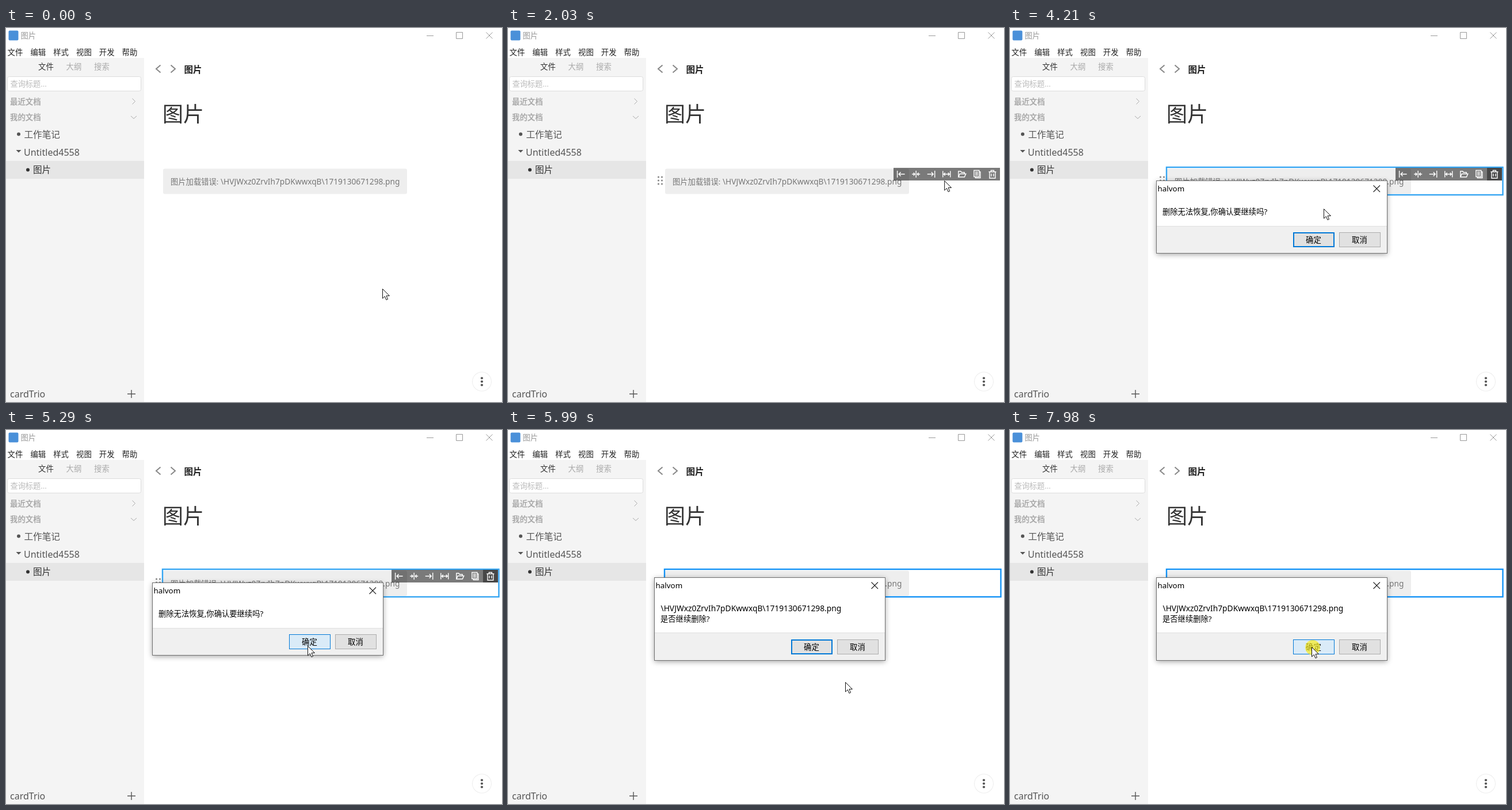
An HTML page that plays this animation: 862x650 px, repeating every 8 s.

```html
<!DOCTYPE html>
<html lang="zh-CN">
<head>
<meta charset="utf-8">
<title>图片</title>
<style>
html, body { margin: 0; width: 100%; height: 100%; overflow: hidden; background: #fff; }
svg { display: block; width: 100%; height: 100%; }
text { font-family: "Noto Sans", "Noto Sans CJK SC", "Noto Sans CJK", sans-serif; white-space: pre; }
.shadow { filter: drop-shadow(0 2px 5px rgba(0, 0, 0, .38)); }
</style>
</head>
<body>
<svg id="stage" viewBox="0 0 862 650"></svg>
<script>
const LOOP = 8000;
const PATH = '\\HVJWxz0ZrvIh7pDKwwxqB\\1719130671298.png';

// y is the optical middle of the line
const txt = (x, y, size, s, fill, extra = '') =>
  `<text x="${x}" y="${y + size * .38}" font-size="${size}" fill="${fill}" ${extra}>${s}</text>`;
const box = (x, y, w, h, fill, extra = '') =>
  `<rect x="${x}" y="${y}" width="${w}" height="${h}" fill="${fill}" ${extra}/>`;
const dot = (x, y, r, fill) => `<circle cx="${x}" cy="${y}" r="${r}" fill="${fill}"/>`;
const line = (d, stroke, w = 1, extra = '') =>
  `<path d="${d}" fill="none" stroke="${stroke}" stroke-width="${w}" ${extra}/>`;
const BOLD = 'font-weight="700"';

function titleBar() {
  return box(4.5, 4.5, 17, 17, '#4a90d9', 'rx="2"') +
    `<g id="caption">${txt(25.5, 13, 13.3, '图片', 'currentColor')}` +
    line('M731 13.5H743M782.5 7.5H793.5V18.5H782.5ZM834.5 7.5L845.5 18.5M845.5 7.5L834.5 18.5', 'currentColor') +
    '</g>' +
    ['文件', '编辑', '样式', '视图', '开发', '帮助']
      .map((s, i) => txt(2.6 + i * 39.8, 42, 13.4, s, '#222')).join('');
}

function sidebar() {
  return box(0, 52, 240, 598, '#f4f4f4') +
    txt(56, 67, 13.4, '文件', '#333') + txt(104.5, 67, 13.4, '大纲', '#aaa') + txt(153, 67, 13.4, '搜索', '#aaa') +
    box(2.5, 84.5, 232, 25, '#fff', 'stroke="#ddd" rx="3"') +
    txt(7.5, 97, 13.2, '查询标题...', '#bbb') +
    txt(7, 128, 13.4, '最近文档', '#aaa', BOLD) + line('M219.5 122.5L224.5 127.5L219.5 132.5', '#aaa') +
    txt(7, 155, 13.4, '我的文档', '#aaa', BOLD) + line('M217 153L222 157.5L227 153', '#aaa') +
    dot(22, 184.5, 3, '#555') + txt(31.5, 185, 15.6, '工作笔记', '#555') +
    '<path d="M17.5 212H26.5L22 216.5Z" fill="#555"/>' + txt(31, 215.5, 16, 'Untitled4558', '#555') +
    box(0, 231, 240, 31, '#e6e6e6') + dot(38, 246.5, 3, '#333') + txt(47, 246.5, 15.6, '图片', '#333') +
    txt(7, 636, 16, 'cardTrio', '#555') + line('M211 636H225M218 629V643', '#555', 1.4);
}

const grip = () => [261.5, 267.5].map(x => [259, 265, 271].map(y => dot(x, y, 1.6, '#888')).join('')).join('');

function toolbar() {
  const icons = [
    'M-6-6V6M7 0H-3M0-3.5L-3.5 0L0 3.5',
    'M0-6V6M-7 0H-2M7 0H2M-4.5-2.5L-2 0L-4.5 2.5M4.5-2.5L2 0L4.5 2.5',
    'M6-6V6M-7 0H3M0-3.5L3.5 0L0 3.5',
    'M-6.5-5.5V5.5M6.5-5.5V5.5M-5 0H5M-2.5-2.5L-5 0L-2.5 2.5M2.5-2.5L5 0L2.5 2.5',
    'M-6 5V-5H-2L-.5-3H4.5V-.5M-6 5L-3.5-.5H7L4.5 5Z',
    'M-5.5-6.5H3.5V4.5H-5.5ZM3.5-4H5.5V6.5H-3V4.5M-3.5-3.5H1.5M-3.5-1H1.5M-3.5 1.5H1.5',
    'M-6.5-4H6.5M-2.5-4V-6.5H2.5V-4M-5-4V7H5V-4M-2-1V4M2-1V4'
  ];
  return box(670, 243, 185, 22, 'rgba(0,0,0,.52)') +
    box(829, 243, 26, 22, 'rgba(0,0,0,.42)', 'id="binHover"') +
    icons.map((d, i) => line(d, '#fff', 1.4, `transform="translate(${682.6 + i * 26.55} 254)"`)).join('');
}

function page() {
  return line('M268.5 64.5L261 71L268.5 77.5', '#888', 2) + line('M286.5 64.5L294 71L286.5 77.5', '#888', 2) +
    txt(309.5, 72, 15.6, '图片', '#222', BOLD) +
    txt(272, 149, 36, '图片', '#333', 'font-weight="300"') +
    box(273, 244.5, 424, 44, '#eee', 'rx="3"') +
    txt(286, 267, 13.3, '图片加载错误:', '#777') + txt(373, 267, 13.7, PATH, '#777') +
    box(272, 242, 584.5, 48, 'none', 'id="outline" stroke-width="2.4"') +
    `<g id="grip">${grip()}</g><g id="tools">${toolbar()}</g>` +
    dot(827, 614.5, 17, '#ededed') + dot(827, 614.5, 16, '#fff') +
    [608.5, 614.5, 620.5].map(y => dot(827, y, 2.1, '#555')).join('');
}

function dialog(id, top, height, foot, body) {
  const by = top + height - 37;
  const x = [492, 572];
  return `<g id="${id}"><g class="shadow">${box(254.5, top + .5, 401, height - 1, '#fff')}</g>` +
    box(255, top + foot, 400, height - foot - 1, '#f0f0f0') + line(`M255 ${top + foot - .5}H655`, '#dfdfdf') +
    box(254.5, top + .5, 401, height - 1, 'none', 'stroke="#707070"') +
    txt(256.5, top + 14, 13.4, 'halvom', '#000') +
    line(`M631.5 ${top + 8.5}l11.5 11.5m0-11.5l-11.5 11.5`, '#222', 1.1) + body +
    box(x[0] + 1, by + 1, 70, 24, '#e1e1e1', 'stroke="#0078d7" stroke-width="2"') +
    `<g class="hover">${box(x[0] + .5, by + .5, 71, 25, '#daebf8', 'stroke="#0078d7"')}</g>` +
    box(x[1] + .5, by + .5, 71, 25, '#e1e1e1', 'stroke="#adadad"') +
    txt(514, by + 13, 13.4, '确定', '#000') + txt(594, by + 13, 13.4, '取消', '#000') + '</g>';
}

document.getElementById('stage').innerHTML =
  box(0, 0, 862, 650, '#fff') + titleBar() + sidebar() + page() +
  dialog('ask', 265, 127, 80, txt(265, 319, 13.3, '删除无法恢复,你确认要继续吗?', '#000')) +
  dialog('confirm', 256, 145, 97, txt(265.5, 310, 13.8, PATH, '#000') + txt(265, 328, 13.3, '是否继续删除?', '#000')) +
  '<circle id="click" r="13" fill="#f8ea18"/>' +
  '<path id="cursor" d="M.5 .5V17L4.3 13.4L6.9 19.5L9.5 18.4L7 12.4H12.4Z" fill="#fff" stroke="#111" stroke-width="1"/>';

const el = Object.fromEntries([...document.querySelectorAll('#stage [id]')].map(e => [e.id, e]));
const hovers = ['ask', 'confirm'].map(id => el[id].querySelector('.hover'));

// Pointer moves: first step, last step, step count, waypoints, ease-out power
const moves = [
  [70, 130, 2, [[654, 453], [656, 380]], 1],
  [990, 1550, 9, [[656, 380], [649, 268]], 1],
  [1830, 2510, 11, [[649, 268], [841, 263]], 1.86],
  [3590, 4350, 12, [[841, 263], [800, 266], [735, 275], [660, 288], [590, 302], [545, 314], [530, 361]], 1],
  [4410, 4620, 4, [[530, 361], [524, 380]], 1],
  [4820, 5290, 7, [[524, 380], [524, 375]], 1],
  [5640, 6410, 12, [[524, 375], [552, 402], [574, 426], [586, 438], [572, 443], [535, 436], [507, 419]], 1],
  [6470, 6471, 1, [[507, 419], [507, 420]], 1],
  [6610, 7380, 12, [[507, 420], [524, 378]], 1],
  [7450, 7451, 1, [[524, 378], [524, 377]], 1]
];
const clicks = [[2850, 2990], [5360, 5570], [7850, LOOP]];

function pointer(t) {
  const m = moves.filter(v => v[0] <= t).pop();
  if (!m) return moves[0][3][0];
  const [start, end, steps, pts, power] = m;
  const step = Math.min(steps, Math.floor((t - start) / (end - start) * (steps - 1) + .1) + 1);
  const p = (1 - (1 - step / steps) ** power) * (pts.length - 1);
  const i = Math.min(pts.length - 2, Math.floor(p));
  return [0, 1].map(k => pts[i][k] + (pts[i + 1][k] - pts[i][k]) * (p - i));
}

const within = (t, a, b) => t >= a && t < b;
const show = (e, a) => e.setAttribute('opacity', +a);
const fadeIn = (t, at) => t < at ? 0 : t < at + 70 ? .6 : 1;

function render(t) {
  const [x, y] = pointer(t);
  el.cursor.setAttribute('transform', `translate(${x} ${y})`);

  const press = clicks.find(c => within(t, ...c));
  show(el.click, press ? (t - press[0] < 70 ? .5 : .68) : 0);
  el.click.setAttribute('cx', x + 2);
  el.click.setAttribute('cy', y + 1);

  const active = within(t, 2850, 2990) || within(t, 5430, 5500);
  el.caption.setAttribute('color', active ? '#000' : '#999');

  const inBlock = within(t, 1480, 5430);
  show(el.grip, inBlock);
  show(el.tools, inBlock ? Math.min(1, (t - 1340) / 350) : 0);
  show(el.binHover, inBlock && (t > 2850 || x >= 829 && y < 265));
  show(el.outline, t >= 2850);
  el.outline.setAttribute('stroke', t < 5430 ? '#35a5f2' : '#1292f6');

  show(el.ask, t < 5430 ? fadeIn(t, 2990) : 0);
  show(el.confirm, fadeIn(t, 5500));
  show(hovers[0], t >= 4410);
  show(hovers[1], within(x, 492, 564) && within(y, 364, 390));
}

function tick(now) {
  render(now % LOOP);
  requestAnimationFrame(tick);
}
render(0);
requestAnimationFrame(tick);
</script>
</body>
</html>
```
